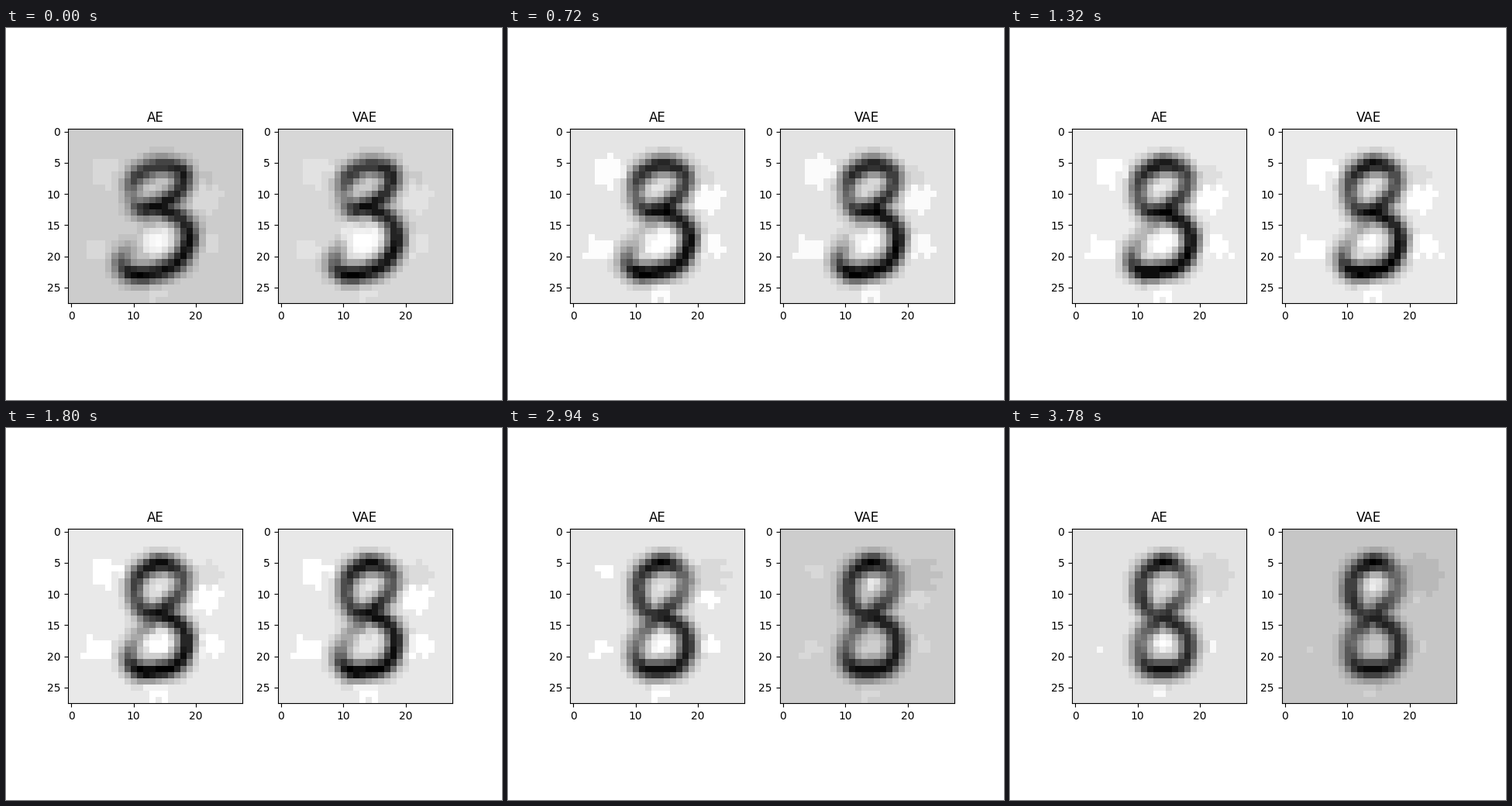
A matplotlib script that plays this animation: 640 px wide and 480 px high, repeating every 3.84 s.

```python
import numpy as np
import matplotlib.pyplot as plt
from matplotlib.animation import FuncAnimation

FRAMES, STEP_MS, SIZE = 64, 60, 28
SIGMA, LEVELS, SAMPLES = 1.12, 18, 10

# One pen path (x, y, ink): waist, upper loop, waist, lower bowl, back to the waist.
THREE = np.array([
    (14.3, 12, .95), (17.3, 9.6, .78), (17.8, 6.6, .85), (14, 5.6, .72),
    (10.3, 7.4, .7), (9.8, 10.5, .35), (11.3, 12.4, .75), (14, 12.2, .95),
    (17.8, 14.2, .8), (18.9, 17.5, .92), (17, 21, .9), (13.5, 22.6, .9),
    (10, 22.8, .95), (8.1, 21, .55), (10.3, 17, 0), (13, 14.3, .2)])
EIGHT = np.array([
    (14.4, 13.4, .85), (17.5, 10, .5), (17.5, 6.8, .5), (14.4, 5, 1),
    (11, 7, .75), (10.6, 10.5, .78), (12.2, 13.3, .75), (15, 14.2, .85),
    (17.5, 16, .8), (18.2, 18.8, .8), (17, 21.5, .85), (14, 22.1, .95),
    (11.5, 21.6, .85), (10.4, 19.4, .6), (10.8, 16.6, .55), (13, 14.5, .8)])

# Light spots beside the digit: x, y, first radius, last radius.
SPOTS = [(5.5, 6.5, 2.3, .3), (21.5, 11, 2.3, .6), (22, 18.5, 2, 1),
         (4.5, 19, 1.8, .6), (13.5, 25.5, 1.6, .8)]
SHADOW = (21.5, 7, 1, 3)

GRID_Y, GRID_X = np.indices((SIZE, SIZE))
RAGGED = np.random.default_rng(4).normal(0, .2, (SIZE, SIZE))


def lerp(a, b, t):
    return a + (b - a) * t


def spline(points):
    """Catmull-Rom curve through the points."""
    p = np.vstack([points[:1], points, points[-1:]])
    p0, p1, p2, p3 = p[:-3], p[1:-2], p[2:-1], p[3:]
    u = np.linspace(0, 1, SAMPLES)[:, None, None]
    curve = .5 * (2 * p1 + (p2 - p0) * u + (2 * p0 - 5 * p1 + 4 * p2 - p3) * u ** 2
                  + (3 * p1 - p0 - 3 * p2 + p3) * u ** 3)
    return curve.reshape(-1, 3).T


def draw_digit(t, squeeze):
    # The upper loop closes sooner than the lower one.
    order = np.linspace(.55, 1, len(THREE))[:, None]
    x, y, ink = spline(lerp(THREE, EIGHT, t ** order))
    x = 14 + (x - 14) * lerp(squeeze, 1, t)
    d2 = (GRID_X[..., None] - x) ** 2 + (GRID_Y[..., None] - y) ** 2
    image = (np.clip(ink, 0, 1) * np.exp(-d2 / (2 * SIGMA ** 2))).max(axis=2)
    return np.round(image / image.max() * LEVELS) / LEVELS


def closeness(spot, t, swell=0.0):
    """1 at the middle of a spot, 0 at its rim, negative outside."""
    x, y, first, last = spot
    radius = lerp(first, last, t) + swell * np.sin(np.pi * t)
    if radius <= 0:
        return np.full((SIZE, SIZE), -1.0)
    return 1 - np.hypot(GRID_X - x, GRID_Y - y) / radius


class Panel:
    def __init__(self, title, squeeze, base, holes):
        self.title, self.squeeze, self.base, self.holes = title, squeeze, base, holes

    def image(self, n):
        t = n / (FRAMES - 1)
        base = np.interp(t, *self.base)
        ink = draw_digit(t, self.squeeze)
        tone = np.full((SIZE, SIZE), base)
        tone[closeness(SHADOW, t) + RAGGED > 0] = base - .05
        for spot in SPOTS:
            tone[closeness(spot, t, .8) + RAGGED > 0] = base + np.clip(base - .8, .045, .1)
        for hole in self.holes:
            tone += .2 * np.sqrt(np.clip(closeness(hole, t), 0, 1))
        return np.minimum(tone, 1) * (1 - ink)


panels = [
    Panel("AE", 1, ((0, .2, .35, 1), (.8, .9, .92, .888)), [(13.8, 17.6, 3, 1.5)]),
    Panel("VAE", .92, ((0, .3, .47, .75, 1), (.84, .92, .91, .805, .775)),
          [(13, 17.3, 3.8, -3), (14.3, 8.2, -2, 2)]),
]

fig, axes = plt.subplots(1, 2, figsize=(6.4, 4.8), dpi=100)
views = []
for ax, panel in zip(axes, panels):
    ax.set_title(panel.title)
    views.append(ax.imshow(panel.image(0), cmap="gray", vmin=0, vmax=1,
                           interpolation="nearest"))


def update(n):
    for view, panel in zip(views, panels):
        view.set_data(panel.image(n))
    return views


anim = FuncAnimation(fig, update, frames=FRAMES, interval=STEP_MS, repeat=True,
                     repeat_delay=0, blit=False)
plt.show()
```
